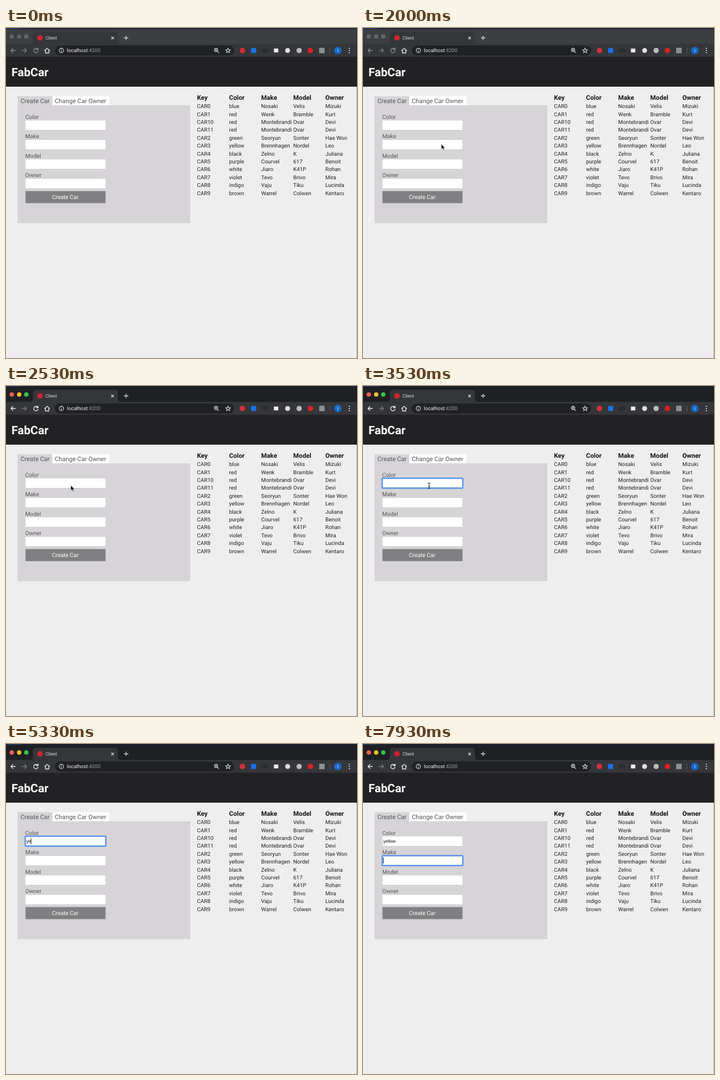
Write an HTML page that moves like this. It is 640 px wide and 602 px high and loops after 8000 ms.

```html
<!DOCTYPE html>
<html lang="en">
<head>
<meta charset="utf-8">
<title>Client</title>
<style>
  html, body { margin: 0; width: 100%; height: 100%; overflow: hidden; background: #eee; }
  svg { display: block; font-family: Roboto, sans-serif; text-rendering: geometricPrecision; }
  .line { fill: none; stroke-width: 1.3; }
  .label { font-size: 10.4px; fill: #555; }
  .head { font-size: 11.7px; font-weight: 700; fill: #161616; }
  .cell { font-size: 9.9px; fill: #222; }
  .typed { font: 8px "Liberation Sans", Arial, sans-serif; fill: #000; }
</style>
</head>
<body>
<svg width="640" height="602" viewBox="0 0 640 602">
  <rect width="640" height="602" fill="#eee"/>

  <!-- browser frame -->
  <rect id="strip" width="640" height="30"/>
  <rect width="640" height="2" fill="#1b2031"/>
  <rect width="28" height="1" fill="#2b467f"/>
  <g id="lights"></g>
  <path d="M43 29.5Q49 29 49 23V13Q49 7 55 7H198Q204 7 204 13V23Q204 29 210 29.5Z" fill="#35363a"/>
  <rect y="29" width="640" height="24" fill="#35363a"/>
  <circle cx="62" cy="18" r="5" fill="#d0252f"/>
  <text x="72" y="21" font-size="8.3" fill="#dcdde0">Client</text>
  <g class="line" stroke="#d5d6d9">
    <path d="M192 16l4.500 4.500m0-4.500l-4.500 4.500"/>
    <path d="M215 18h8m-4-4v8"/>
  </g>
  <g class="line" id="nav">
    <path d="M17.500 41H9m4-4l-4 4l4 4"/>
    <path d="M57.500 38.500A4 4 0 1 0 58.500 42M58.500 36v3.500h-3.500"/>
  </g>
  <path class="line" stroke="#77797d" d="M29 41h8.500m-4-4l4 4l-4 4"/>
  <path class="line" stroke="#f0f0f0" d="M70 41.500L75 37l5 4.500M72 40.500V45.500h6V40.500"/>
  <rect x="89" y="32" width="327" height="18" rx="9" fill="#202124"/>
  <g class="line" stroke="#c4c6ca">
    <circle cx="101" cy="41" r="4"/>
    <path d="M101 40.500v3M101 38.300v1"/>
    <circle cx="383" cy="40" r="3"/>
    <path d="M385.200 42.200l3 3M381.500 40h3M383 38.500v3"/>
    <path d="M405 36.800l1.300 2.800 3 .3-2.300 2 .7 3-2.700-1.600-2.700 1.600.7-3-2.300-2 3-.3z"/>
  </g>
  <text x="111" y="44.300" font-size="9.3" fill="#f1f1f2">localhost<tspan fill="#9b9ea3">:4200</tspan></text>
  <circle cx="431" cy="41" r="5" fill="#d33039"/>
  <rect x="447" y="36.500" width="9" height="9" fill="#1b72e8"/>
  <path class="line" stroke="#1e1f22" d="M470 38l-3 3l3 3M474 38l3 3l-3 3M473 37l-2 8"/>
  <rect x="488.500" y="37.500" width="8" height="7" fill="#eee"/>
  <circle cx="513.500" cy="41" r="4.500" fill="#dedede"/>
  <circle cx="534.500" cy="41" r="4.800" fill="#bbb"/>
  <circle cx="555" cy="41" r="5" fill="#d92025"/>
  <rect x="571" y="36" width="10" height="10" fill="#8c8e91"/>
  <path d="M590.500 36v10" stroke="#5e6064"/>
  <circle cx="605" cy="41" r="6.800" fill="#1669c9"/>
  <text x="605" y="44" font-size="8" fill="#fff" text-anchor="middle">I</text>
  <g fill="#f0f0f0">
    <circle cx="626" cy="37" r="1.100"/><circle cx="626" cy="41" r="1.100"/><circle cx="626" cy="45" r="1.100"/>
  </g>

  <!-- page -->
  <rect y="52.500" width="640" height="54.500" fill="#222123"/>
  <text x="10" y="88" font-size="21.200" font-weight="700" fill="#fff">FabCar</text>
  <rect x="21" y="141" width="315" height="215" fill="#d6d4d7"/>
  <rect x="21" y="124.500" width="63.500" height="17" fill="#d6d4d7"/>
  <rect x="84.500" y="124.500" width="104" height="16.500" fill="#fff"/>
  <g font-size="11.3" fill="#555">
    <text x="26.500" y="137">Create Car</text>
    <text x="89" y="137">Change Car Owner</text>
  </g>
  <g id="form"></g>
  <rect x="35.500" y="297.500" width="146" height="22" fill="#807f81"/>
  <text x="108" y="312.300" font-size="10.3" fill="#fff" text-anchor="middle">Create Car</text>
  <g id="table"></g>
  <rect x="639" width="1" height="602" fill="#000" opacity=".25"/>

  <!-- moving parts -->
  <rect id="focus" x="35" width="147" height="18" rx="1.500" fill="none" stroke="#5a93ee" stroke-width="2.500"/>
  <text id="typed" class="typed" x="37" y="180"></text>
  <rect id="caret" width="1" height="11" fill="#111"/>
  <circle id="ring" cx="118.500" cy="182" r="12.800" fill="none" stroke="#000" stroke-width="2.300"/>
  <path id="arrow" d="M0 0V10L2.300 8L4 11.500L5.700 10.700L4.200 7.300H7.200Z" fill="#111" stroke="#fff" stroke-width=".7"/>
  <path id="beam" d="M-2.500-5Q0-5 0-3.500Q0-5 2.500-5M0-4V4M-2.500 5Q0 5 0 3.500Q0 5 2.500 5M-1.300 1.500H1.300" fill="none" stroke="#111"/>
</svg>
<script>
const $ = id => document.getElementById(id);
const text = (cls, x, y, s) => `<text class="${cls}" x="${x}" y="${y}">${s}</text>`;

$('form').innerHTML = ['Color', 'Make', 'Model', 'Owner'].map((name, i) => {
  const y = 168 + 35.5 * i;
  return text('label', 35, y - 2.2, name) +
    `<rect x="35" y="${y}" width="147" height="18.500" fill="#c5c3c6"/>` +
    `<rect x="35.500" y="${y + .5}" width="146" height="17.500" fill="#fff"/>`;
}).join('');

const cars = `Key,Color,Make,Model,Owner
CAR0,blue,Nosaki,Velis,Mizuki
CAR1,red,Wenk,Bramble,Kurt
CAR10,red,Montebrandi,Ovar,Devi
CAR11,red,Montebrandi,Ovar,Devi
CAR2,green,Seoryun,Sonter,Hae Won
CAR3,yellow,Brennhagen,Nordel,Leo
CAR4,black,Zelno,K,Juliana
CAR5,purple,Courvel,617,Benoit
CAR6,white,Jiaro,K41P,Rohan
CAR7,violet,Tevo,Brivo,Mira
CAR8,indigo,Vaju,Tiku,Lucinda
CAR9,brown,Warrel,Colwen,Kentaro`;
$('table').innerHTML = cars.split('\n').map((row, r) => row.split(',').map((s, c) =>
  text(r ? 'cell' : 'head', 348.3 + 58.5 * c, r ? 131.7 + 14.4 * r : 131, s)).join('')).join('');

$('lights').innerHTML = [10.5, 24, 37].map(x => `<circle cx="${x}" cy="15.500" r="4"/>`).join('');

const arrowPath = [[1600, 97, 139], [1970, 143, 212], [2400, 118, 181]];
const beamPath = [[3530, 120.5, 182], [3730, 127, 185], [3930, 127, 185], [4000, 125.5, 183], [4930, 125.5, 183], [5000, 128, 185]];
const keys = [[5130, 'y'], [5330, 'ye'], [5470, 'yel'], [5670, 'yell'], [5930, 'yello'], [6600, 'yellow']];
const blinks = [3000, 3530, 4000, 4530, 4930, 6330, 6600, 7470, 7930];   // on, off, on, ...

const clamp = p => p < 0 ? 0 : p > 1 ? 1 : p;
function along(path, t) {
  let i = 0;
  while (i < path.length - 2 && t >= path[i + 1][0]) i++;
  const [a, b] = [path[i], path[i + 1]];
  const p = clamp((t - a[0]) / (b[0] - a[0]));
  const e = p * p * (3 - 2 * p);
  return [a[1] + (b[1] - a[1]) * e, a[2] + (b[2] - a[2]) * e];
}
const show = (id, on) => $(id).setAttribute('visibility', on ? 'visible' : 'hidden');
const move = (id, [x, y]) => $(id).setAttribute('transform', `translate(${x} ${y})`);
const within = (t, a, b) => t >= a && t < b;

function draw(t) {
  const active = t >= 2530;
  $('strip').setAttribute('fill', active ? '#1f2023' : '#3c3e42');
  $('nav').setAttribute('stroke', active ? '#f0f0f0' : '#8c8e92');
  [...$('lights').children].forEach((dot, i) =>
    dot.setAttribute('fill', t >= 2470 ? ['#f45e56', '#f7bd2f', '#32c545'][i] : '#626468'));

  show('arrow', within(t, 1600, 3000));
  move('arrow', along(arrowPath, t));
  show('beam', within(t, 3000, 5130));
  move('beam', along(beamPath, t));
  show('ring', within(t, 2470, 2530) || within(t, 2930, 3000));

  const second = t >= 6930;
  $('focus').setAttribute('y', second ? 203.7 : 168.2);
  $('focus').setAttribute('opacity', clamp((t - 2930) / 200));

  const typed = keys.reduce((s, k) => t >= k[0] ? k[1] : s, '');
  $('typed').textContent = typed;
  const width = typed && !second ? $('typed').getComputedTextLength() : 0;
  show('caret', blinks.filter(b => t >= b).length % 2);
  $('caret').setAttribute('x', 36.7 + width);
  $('caret').setAttribute('y', second ? 207 : 172);
}

const start = performance.now();
function tick() {
  draw((performance.now() - start) % 8000);
  requestAnimationFrame(tick);
}
tick();
</script>
</body>
</html>
```
